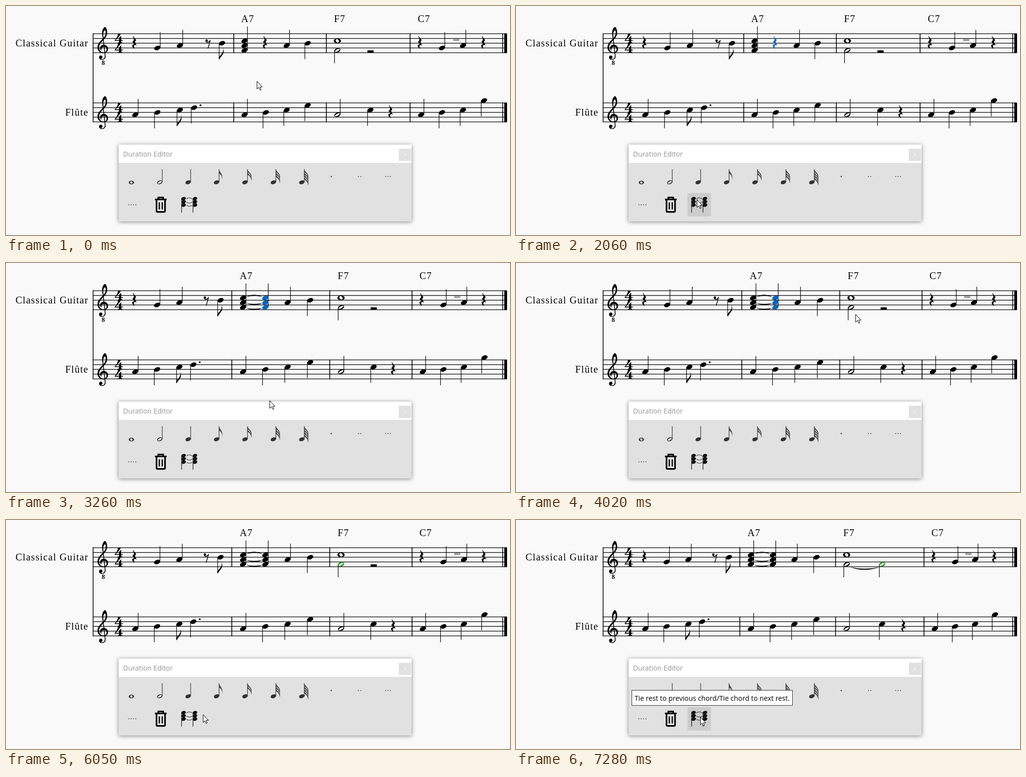
Recreate the animation shown at these times as an HTML page. Size 1029 px wide and 470 px high, loop 8.14 s.

```html
<!DOCTYPE html>
<html lang="en">
<head>
<meta charset="utf-8">
<title>Duration Editor</title>
<style>
  html, body { margin: 0; height: 100%; overflow: hidden; background: #f9f9f9; }
  svg { display: block; width: 1029px; height: 470px; }
  .label { font: 20px "Liberation Serif", serif; letter-spacing: 1.3px; }
  .chord { font: 20px "Liberation Serif", serif; letter-spacing: 1.2px; }
  .octave { font: bold 12px "Noto Serif", serif; }
  .ui { font: 14.2px "Open Sans", sans-serif; }
</style>
</head>
<body>
<svg id="stage" viewBox="0 0 1029 470"></svg>
<script>
const LOOP = 8140, STEP = 70, BG = '#f9f9f9', PANEL = '#e1e1e1';
const GUITAR = 95.9, FLUTE = 237.9;          // bottom staff lines
const GAP = 9.75;
const pitchY = (base, step) => base - step * GAP / 2;

// ---- drawing helpers ----
const path = (d, fill = '#000', x = 0, y = 0) =>
  `<path d="${d}" fill="${fill}" transform="translate(${x} ${y})"/>`;
const stroke = (d, w = 1.2, color = '#000') =>
  `<path d="${d}" fill="none" stroke="${color}" stroke-width="${w}"/>`;
const rect = (x, y, w, h, fill, more = '') =>
  `<rect x="${x}" y="${y}" width="${w}" height="${h}" fill="${fill}" ${more}/>`;
const oval = (x, y, rx, ry, turn = 0, fill = '#000') =>
  `<ellipse rx="${rx}" ry="${ry}" fill="${fill}" transform="translate(${x} ${y}) rotate(${turn})"/>`;
const text = (s, x, y, cls, more = '') => `<text class="${cls}" x="${x}" y="${y}" ${more}>${s}</text>`;

// ---- music symbols ----
const head = (x, y, fill) => oval(x, y, 6.6, 4.3, -22, fill);
const halfHead = (x, y, fill) => head(x, y, fill) + oval(x, y, 5.6, 2, -30, BG);
const whole = (x, y) => oval(x, y, 7.5, 4.8) + oval(x, y, 4, 2.9, 55, BG);
const stem = (x, y, dir, len = 32.5) => stroke(`M${x - 5.8 * dir} ${y + dir}V${y + dir * len}`);

// dir: -1 stem up, 1 stem down
const note = (base, x, step, dir) => {
  const y = pitchY(base, step);
  return stem(x, y, dir) + head(x, y);
};
const half = (base, x, step, dir, len, fill) => {
  const y = pitchY(base, step);
  return stem(x, y, dir, len) + halfHead(x, y, fill);
};
const eighth = (base, x, step) => note(base, x, step, 1) +
  path('M0 1V-2C1 -8 10.5 -11 8.2 -22C13 -11 5 -7 1 1Z', '#000', x - 6.2, pitchY(base, step) + 32);
const chord = (x, fill) => stroke(`M${x + 5.9} 91V42`) +
  [1, 3, 5].map(s => head(x, pitchY(GUITAR, s), fill)).join('');
const rest = (base, x, fill) => path(
  'M-2.6 -14.8C-1 -12 2 -9 3.8 -6.4C1 -3.6 .4 -1.5 4.6 3.4L4.2 4.2C0 2.6 -2.6 4.5 .6 11L.1 11.6' +
  'C-6 7 -5.6 1.6 .2 1.8L-4 -2.8C0 -6 0 -8.5 -3.2 -14Z', fill, x, base - 2 * GAP);
const eighthRest = x => oval(x - 3, 71, 2.4, 2.4) +
  stroke(`M${x - 4.5} 72.5C${x - 2} 76 ${x + 3} 74.5 ${x + 4.6} 70L${x - .3} 87.5`, 1.4);
const tie = (x1, x2, y, bend) => {
  const outer = y + bend + Math.sign(bend) * 3;
  return path(`M${x1} ${y}C${x1 + 8} ${y + bend} ${x2 - 8} ${y + bend} ${x2} ${y}` +
    `C${x2 - 8} ${outer} ${x1 + 8} ${outer} ${x1} ${y}Z`);
};

const CLEF = 'M-3.5 5C-8.5 1 -5.5 -6.3 1 -6.3C6.5 -6.3 9.8 -2.5 9.8 2C9.8 7 6 10.4 .5 10.4' +
  'C-6 10.4 -11.3 5.5 -11.3 -1C-11.3 -8 -6.5 -13 -1.5 -18C3 -22.5 5.6 -26.5 5.6 -31' +
  'C5.6 -34 5 -36.3 4 -36.3C1.8 -36.3 0 -32 0 -28.5C0 -27 .1 -26 .4 -24L-1 -23' +
  'C-1.7 -27 -1.9 -29 -1.9 -30.5C-1.9 -36 1 -42.8 3.8 -42.8C5.8 -42.8 8 -37 8 -32' +
  'C8 -25 4.5 -20.5 0 -16C-5 -11 -8.3 -6.5 -8.3 -1.5C-8.3 5 -4.5 9.2 1 9.2' +
  'C5 9.2 7.2 6.3 7.2 3C7.2 -.5 5 -2.6 2 -2.6C-2.5 -2.6 -4.5 2 -3.5 5Z';
const FOUR = 'M6.5 0H12.5C10 5 5 10 1.8 13H8.8V8.6L13.2 4V13H16.5V14.6H13.2V15.5' +
  'C13.2 17.3 14 18 15.6 18.2V19.2H6.4V18.2C8.2 18 8.8 17.3 8.8 15.5V14.6H0V13.2C3.5 9.5 6.5 5 6.5 0Z';

const clef = y => `<g transform="translate(198.3 ${y})" stroke="#000" stroke-width=".5">` + path(CLEF) +
  stroke('M-.4 -24L4 14C5.3 21 2 23.6 -2 23.6C-6 23.6 -7.4 21.5 -7.4 19', 1.6) +
  oval(-4.8, 18.8, 3.1, 3.1) + '</g>';

function staff(base, name) {
  let s = text(name, 168.5, base - 12.9, 'label', 'text-anchor="end"');
  for (let i = 0; i < 5; i++) s += stroke(`M177 ${base - i * GAP}H1022`, 1.15);
  return s + clef(base - GAP) + path(FOUR, '#000', 222, base - 39) + path(FOUR, '#000', 222, base - 19.3) +
    rect(1013.3, base - 39.5, 1.5, 40, '#000') + rect(1017.3, base - 39.5, 5.7, 40, '#000');
}

// Column positions: opening bar (6), barline, four beats, barline, three, barline, four beats
const COLUMNS = [
  [264, 309, 355, 384, 412.5, 441, 465, 487, 530.5, 573, 616, 654, 676.5, 744, 785, 825, 847.5, 890, 933, 976],
  [264, 308.5, 354, 382.5, 409, 438, 461, 484, 529.5, 575, 621, 661, 684, 750.5, 790.5, 829, 851, 893, 935, 977],
  [264, 307.5, 352, 380, 406, 434.5, 457, 479.5, 524.5, 568.5, 613.5, 652.5, 675, 747.5, 791, 833, 855, 896.5, 937.5, 978]
];

function score(c, state) {
  const tied = state > 0, last = state === 2;
  let s = '';
  for (const i of [6, 11, 15])
    for (const b of [GUITAR, FLUTE]) s += rect(c[i] - .8, b - 39.5, 1.6, 40, '#000');
  [['A7', 7], ['F7', 12], ['C7', 16]].forEach(([n, i]) => s += text(n, c[i] - 6.8, 33, 'chord'));

  s += rest(GUITAR, c[0] - 2) + note(GUITAR, c[1], 2, -1) + note(GUITAR, c[2], 3, -1) +
    eighthRest(c[4]) + eighth(GUITAR, c[5], 4) + chord(c[7]);
  if (tied) {
    s += chord(c[8], 'var(--a)');
    [[70, -3.5], [82, 2.5], [92, 2.5]].forEach(([y, bend]) => s += tie(c[7] + 6.5, c[8] - 6, y, bend));
  } else s += rest(GUITAR, c[8] - 1.8, 'var(--a)');
  s += note(GUITAR, c[9], 3, -1) + note(GUITAR, c[10], 4, 1) + whole(c[12], pitchY(GUITAR, 5)) +
    half(GUITAR, c[12], 1, 1, 26.5, last ? '#000' : 'var(--b)');
  s += last
    ? half(GUITAR, c[13], 1, 1, 26.5, 'var(--b)') + tie(c[12] + 7, c[13] - 6, 95, 6.5)
    : rect(c[13] - 6, 91, 12.5, 5, '#000');
  s += rest(GUITAR, c[16] - 2.5) + note(GUITAR, c[17], 2, -1) + rect(c[18] - 20, 67, 12.5, 5, '#a0a0a0') +
    note(GUITAR, c[18], 3, -1) + rest(GUITAR, c[19] - 1.5);

  s += note(FLUTE, c[0], 3, -1) + note(FLUTE, c[1], 4, 1) + eighth(FLUTE, c[2], 5) +
    note(FLUTE, c[3], 6, 1) + oval(c[3] + 13, 203.7, 1.9, 1.9);
  [3, 4, 5, 7].forEach((p, i) => s += note(FLUTE, c[7 + i], p, i ? 1 : -1));
  s += half(FLUTE, c[12], 3, -1, 32.5) + note(FLUTE, c[13], 5, 1) + rest(FLUTE, c[14]);
  [3, 4, 5, 9].forEach((p, i) => s += note(FLUTE, c[16 + i], p, i ? 1 : -1));
  return `<g class="score">${s}</g>`;
}

// ---- panel ----
function icon(i) {
  const x = 256 + 58 * i, ink = '#333';
  if (!i) return oval(x, 362.3, 5.3, 3.8, 0, ink) + oval(x, 362.3, 2.6, 2.1, 50, PANEL);
  let s = stroke(`M${x + 5} 361V335`, 1.3, '#444') + oval(x, 361.8, 5.8, 3.8, -22, ink);
  if (i === 1) s += oval(x, 361.8, 4.5, 1.8, -28, PANEL);
  for (let f = 0; f < i - 2; f++)
    s += i === 3
      ? path('M0 0C1 7 9 9 6 22C6.5 14 4 11 0 9Z', '#444', x + 5, 335)
      : path('M0 0C1 6 11 9 8 19C7.5 12 4 8.5 0 6Z', '#444', x + 5, 335 + f * 5);
  return s;
}

function panel() {
  let s = rect(230, 284.5, 598, 157.5, PANEL, 'style="filter:drop-shadow(0 1px 4px #0007)"') +
    rect(230, 284.5, 598, 37.5, '#fff') + text('Duration Editor', 239, 309, 'ui', 'fill="#939393"') +
    rect(802, 293, 25, 25, PANEL) + stroke('M811.5 302.5l6 6m0 -6l-6 6', 1, '#f8f8f8') +
    rect(350, 384, 48, 48, '#cdcdcd', 'rx="3" id="hover"');
  for (let i = 0; i < 7; i++) s += icon(i);
  [[664, 350], [722, 350], [780, 350], [258, 408]].forEach(([x, y], n) => {
    for (let k = 0; k <= n; k++) s += oval(x + (k - n / 2) * 4.8, y, n ? 1.1 : 1.5, n ? 1.1 : 1.5, 0, '#555');
  });
  s += stroke('M304 397H328M311 396.5V393H321V396.5M307.3 397V420.5Q307.3 422.7 309.5 422.7H322.5Q324.7 422.7 324.7 420.5V397', 3.2) +
    stroke('M313 403V417.5M319 403V417.5', 2.5);
  for (const x of [362.5, 385.8]) {
    s += stroke(`M${x - 4} 395V424`, 1.3, '#222');
    for (const y of [395.3, 402, 408.7]) s += oval(x, y, 4.8, 3.5, -18, '#111');
  }
  return s + stroke('M368.5 396Q374 391.5 380 396M368.5 402.5Q374 406.5 380 402.5M368.5 409Q374 413 380 409', 1.2, '#333');
}

const stage = document.getElementById('stage');
stage.innerHTML = staff(GUITAR, 'Classical Guitar') + staff(FLUTE, 'Flûte') +
  rect(177, 56.4, 1.5, 182, '#000') + text('8', 195.2, 121, 'octave') +
  COLUMNS.map(score).join('') + panel() +
  '<g id="tip">' + rect(236.5, 349.5, 328, 31, '#fff', 'stroke="#333"') +
  text('Tie rest to previous chord/Tie chord to next rest.', 242, 371, 'ui') + '</g>' +
  '<path id="cursor" d="M.5 .5V16.3L4 13L6.6 18.5L9 17.5L6.4 12.2H11.3Z" fill="#fff" stroke="#000"/>';

const scores = [...document.querySelectorAll('.score')];
const [hover, tip, cursor] = ['hover', 'tip', 'cursor'].map(id => document.getElementById(id));

// Pointer moves: first step time, step count, destination
const MOVES = [
  [200, 10, 532, 89], [1030, 4, 529, 87], [1570, 9, 367, 401], [3260, 4, 757, 129],
  [3670, 6, 693, 105], [4090, 4, 680, 96], [4500, 3, 680, 92], [5490, 1, 627, 162],
  [5560, 8, 402, 399], [6120, 3, 385, 405], [6330, 3, 376, 404]
];

function pointer(t) {
  let x = 512, y = 154;
  for (const [start, n, toX, toY] of MOVES) {
    if (t < start) break;
    const p = Math.min(1, (Math.floor((t - start) / STEP) + 1) / n);
    const e = 1 - (1 - p) ** 2;
    x += (toX - x) * e;
    y += (toY - y) * e;
  }
  return [x, y];
}

const show = (el, on) => { el.style.display = on ? '' : 'none'; };

function draw(t) {
  const state = t < 2600 ? 0 : t < 7140 ? 1 : 2;
  scores.forEach((g, i) => show(g, i === state));
  stage.style.setProperty('--a', t >= 1170 && t < 4890 ? '#0065bf' : '#000');
  stage.style.setProperty('--b', t >= 4890 ? '#008a00' : '#000');
  const [x, y] = pointer(t);
  cursor.setAttribute('transform', `translate(${Math.round(x)} ${Math.round(y)})`);
  show(hover, x >= 350 && x < 398 && y >= 384 && y < 432);
  show(tip, t >= 3000 && t < 3260 || t >= 7280);
}

let begin;
function tick(now) {
  begin ??= now;
  draw((now - begin) % LOOP);
  requestAnimationFrame(tick);
}
draw(0);
requestAnimationFrame(tick);
</script>
</body>
</html>
```
